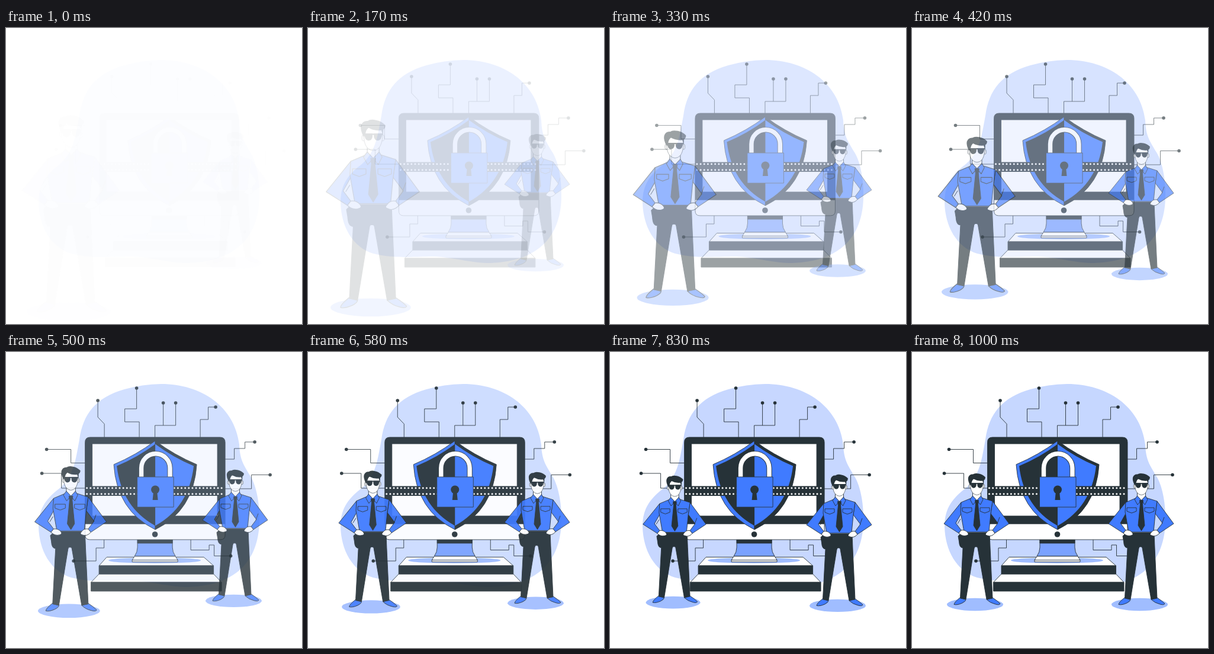
Animation, 500 px wide and 500 px high, one loop 1.04 s. Source, as an HTML page:

```html
<!DOCTYPE html>
<html lang="en">
<head>
<meta charset="utf-8">
<title>Security guards</title>
<style>
  html, body { margin: 0; height: 100%; overflow: hidden; background: #fff; }
  svg { display: block; width: 100vw; height: 100vh; }
  .dark { fill: #263238; }
  .blue { fill: #407bff; }
  .pale { fill: #a0bdff; }
  .white { fill: #fff; }
  .line { stroke: #263238; stroke-width: .9; stroke-linejoin: round; }
  .open { fill: none; }
</style>
</head>
<body>
<svg viewBox="0 0 500 500">
  <defs>
    <g id="guard">
      <ellipse class="pale" cx="106.5" cy="426.5" rx="47.5" ry="10.7"/>
      <g class="line">
        <g class="blue">
          <path d="M81 415L91 418Q91 421 85 424Q76 428 71 426.5Q71 423 81 415Z"/>
          <path d="M126 418L136 415Q144 420 149 425Q148 428 141 426Q132 424 126 418Z"/>
        </g>
        <path class="dark" d="M84 305H131L132 330 136 416 126 418 111 331Q110.500 329 109 329H107Q105.500 329 105 332L91 418 81.500 416 86 331Q80 331 79.500 320L78 311Z"/>
        <g class="blue">
          <path d="M83 254L54 290 79 306 83 301 74 289 83 273Z"/>
          <path d="M136 252L164 290 140 306 136 301 145 289 133 273Z"/>
          <path d="M102 246L83 254 82 270 88 304H130L133 273 136 252 117 246Z"/>
        </g>
        <path class="white" d="M79 306L83 301Q90 300 94 305Q97 309 92 310Q85 312 79 306Z"/>
        <path class="white" d="M140 306L136 301Q129 300 126 305Q122 309 127 310Q134 313 140 306Z"/>
        <path class="open" d="M82 282L77 290M148 279L144 290M85 263H101V269L93 272 85 269ZM115 263H131V269L123 272 115 269Z"/>
        <path class="white" d="M102.500 234V244L109.500 251 116.500 244V234Z"/>
        <path class="blue" d="M102.500 243L98 249 103 258 109.500 250.500ZM116.500 243L120 249 115.500 258 109.500 250.500Z"/>
        <path class="dark" d="M106.500 250.500H112.500L111.500 257 115 293 109.500 302 104 293 107.500 257Z"/>
        <g class="white" stroke-width=".6">
          <ellipse cx="97.800" cy="226.500" rx="1.600" ry="3.500"/>
          <ellipse cx="121" cy="226.500" rx="1.600" ry="3.500"/>
          <path d="M98.500 214V226Q99 234 102.500 238Q106 241.500 109.500 241.500Q113.500 241.500 116.500 238Q119.500 234 120.500 226V214Z"/>
        </g>
      </g>
      <g class="dark">
        <path d="M98 225Q94 217 95 212Q97 206 103 206.500Q106 204 113 205.500Q119 206.500 124 211.500Q124 215 121.500 216.500L121 223 119 217.500Q111 218.500 104 214.500Q101 217 100.500 221L99 225Z"/>
        <path d="M98 221.300H121V223H98Z"/>
        <path d="M99 221.300H108.700V225Q108 229.700 103.700 229.700Q99.300 229.300 99 221.300ZM110.300 221.300H120Q119.700 229.300 115.300 229.700Q111 229.700 110.300 225Z"/>
      </g>
    </g>
  </defs>

  <path id="blob" fill="#c6d7ff" d="M262 54C330 54 386 92 394 156C395 182 401 190 413 210C424 228 429 260 428 288C426 350 392 394 308 397C275 397 255 389 215 386C190 385 150 391 110 381C75 370 56 335 55 295C55 262 70 246 92 229C115 208 118 180 124 148C130 104 152 77 200 63Q230 54.500 262 54Z"/>

  <g id="scene">
    <g id="circuit"></g>

    <g class="line">
      <path class="white" d="M151 375H344.500L358 389H137.500Z"/>
      <path class="dark" d="M137.500 389H358V404H137.500Z"/>
      <path class="white" d="M164 346.500H328L344.500 361H151Z"/>
      <path class="dark" d="M151 361H344.500V375H151Z"/>
    </g>
    <ellipse class="pale" cx="245" cy="352" rx="78" ry="5"/>
    <g class="line">
      <path fill="#7aa2ff" d="M216 317H275V330Q275 338 280 345H211Q216 338 216 330Z"/>
      <path class="dark" d="M216 317H275V323H216Z"/>
      <path class="white" d="M211 345H280L284 351.500V354.500H207V351.500ZM207 351.500H284"/>
      <path class="white" d="M127.500 290H364V309q0 8-8 8H135.500q-8 0-8-8Z"/>
      <path class="dark" d="M127.500 290V152.500q0-8.500 8.500-8.500H355.500q8.500 0 8.500 8.500V290Z"/>
      <path class="white" d="M139.500 155H351V277H139.500Z"/>
    </g>
    <circle class="dark" cx="245.500" cy="308" r="4.800"/>

    <path class="blue line" d="M246 150Q214 174 176 190Q181 268 246 300Z"/>
    <path class="dark line" d="M246 150Q278 174 316 190Q311 268 246 300Z"/>
    <path class="dark" d="M246 155.500Q216 178 181 192.500Q189 262 246 293.500Z"/>
    <path class="blue" d="M246 155.500Q276 178 311 192.500Q303 262 246 293.500Z"/>

    <path class="dark" d="M127.500 226.500H364V243H127.500Z"/>
    <path class="open" stroke="#fff" stroke-width="3" stroke-linecap="round" stroke-dasharray="0 6.150" d="M130.500 229.700H363M130.500 239.700H363"/>

    <g class="open">
      <path stroke="#263238" stroke-width="9.200" d="M222.500 211V196a24.200 24.200 0 0 1 48.400 0V211"/>
      <path stroke="#fff" stroke-width="7.400" d="M222.500 211V196a24.200 24.200 0 0 1 48.400 0V211"/>
    </g>
    <path class="blue line" d="M215.500 211H277V262H215.500Z"/>
    <circle class="dark" cx="246" cy="232.500" r="7"/>
    <path class="dark" d="M243 235H249L250.500 250H241.500Z"/>
  </g>

  <use id="right" href="#guard"/>
  <use id="left" href="#guard"/>
</svg>
<script>
const LOOP = 1040, FPS = 24, LEAD = 0.028;
const $ = id => document.getElementById(id);

// Each trace starts at its dot
const traces = [
  [149, 82, 'V110L160 121.5V144'],
  [214.5, 61, 'V96H194.5V118H219V144'],
  [259.5, 86, 'V124'],
  [280.5, 86, 'V124H245.5V152'],
  [348, 93, 'H335.5V114H322V144'],
  [414, 152, 'H397.5V163H379.5V181H364'],
  [440, 207.5, 'H408.5V231H364'],
  [62.5, 164.5, 'H103.5V187.5H128'],
  [54.5, 205, 'H87.5V230H128'],
  [108, 353, 'H146V331H159.5V317'],
  [373.5, 344.5, 'H345.5V326H337V334.5H306V317']
];
$('circuit').innerHTML = traces.map(([x, y, d]) =>
  `<path class="line open" d="M${x} ${y}${d}"/><circle class="dark" cx="${x}" cy="${y}" r="2.8"/>`).join('');

const cubic = (a, b, s) => 3 * a * s * (1 - s) ** 2 + 3 * b * s * s * (1 - s) + s ** 3;

// cubic-bezier(.36, -.01, .5, 1.38): overshoots before it settles
function ease(t) {
  let lo = 0, hi = 1;
  for (let i = 0; i < 24; i++) {
    const mid = (lo + hi) / 2;
    if (cubic(.36, .5, mid) < t) lo = mid; else hi = mid;
  }
  return cubic(-.01, 1.38, lo);
}

function place(id, opacity, transform) {
  $(id).setAttribute('opacity', Math.max(0, Math.min(1, opacity)));
  if (transform) $(id).setAttribute('transform', transform);
}

function draw(ms) {
  let step = Math.floor(ms * FPS / 1000 + .1);
  if (step < 2) step = 0;
  const t = Math.min(1, step / FPS + LEAD), p = ease(t), rest = 1 - p;
  place('blob', 1 - (1 - t) ** 2);
  place('scene', p, `translate(${30 * rest} 0)`);
  place('right', p, `translate(278 ${-30 * rest})`);
  place('left', p, `translate(108 321) scale(${1 + rest / 2}) translate(-108 -321)`);
}

const start = performance.now();
function tick() {
  draw((performance.now() - start) % LOOP);
  requestAnimationFrame(tick);
}
tick();
</script>
</body>
</html>
```
